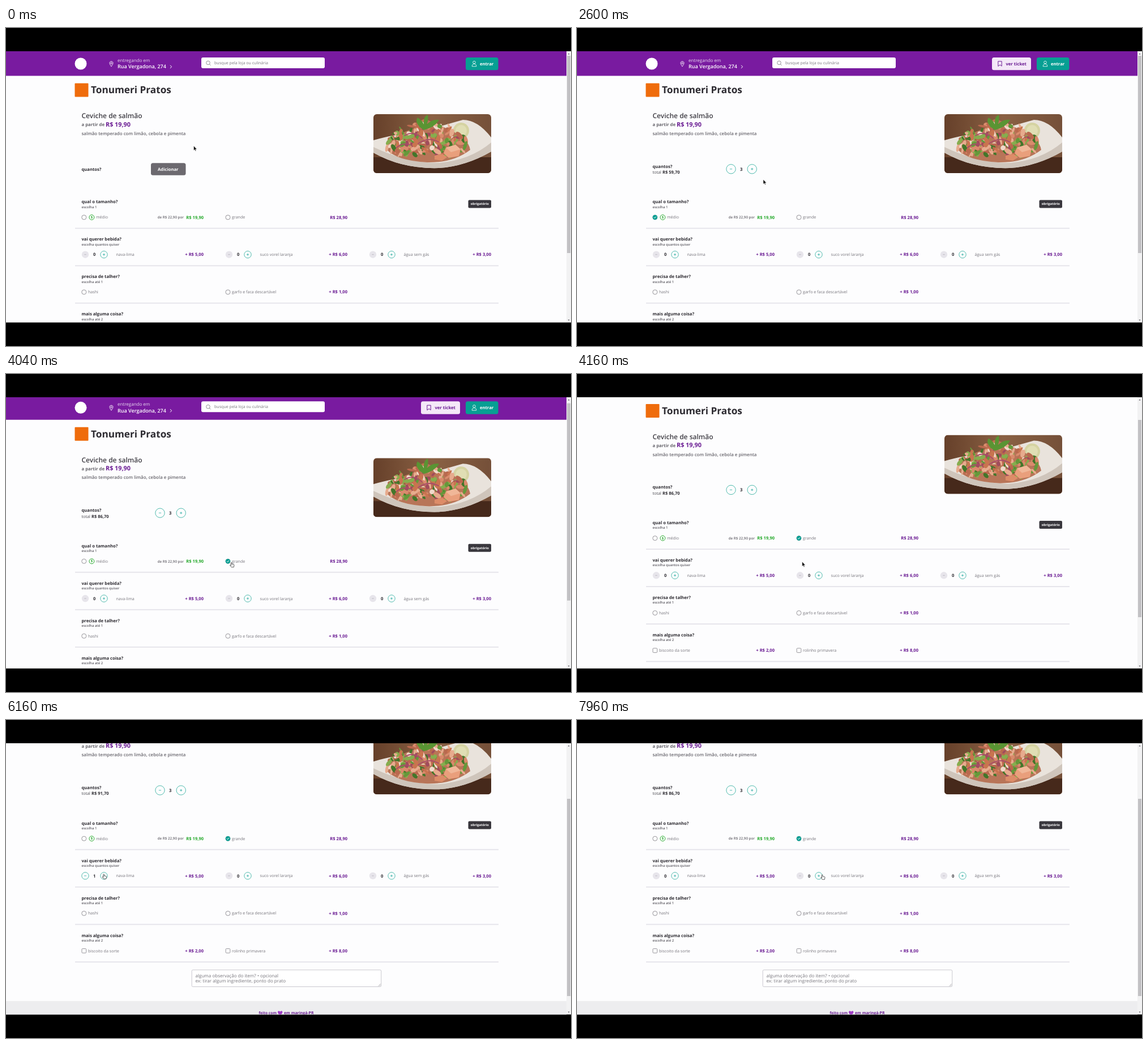
Write an HTML page that moves like this. It is 998 px wide and 561 px high and loops after 8000 ms.

```html
<!DOCTYPE html>
<html lang="pt-BR">
<head>
<meta charset="utf-8">
<title>Pedido</title>
<style>
  html, body { margin: 0; width: 100%; height: 100%; overflow: hidden; background: #000; }
  svg { display: block; width: 998px; height: 561px; font-family: "Open Sans", "Noto Sans", sans-serif; text-rendering: geometricPrecision; }
</style>
</head>
<body>
<svg id="stage" viewBox="0 0 998 561"></svg>
<script>
const LOOP = 8000, SCROLL = 124.8;
const INK = '#2d2b31', GREY = '#77757c', PURPLE = '#6a1b93', TEAL = '#079f93', GREEN = '#25a92b';

// y is the middle of the capitals
const text = (x, y, s, size, weight = 400, fill = GREY, anchor = 'start', id = '') =>
  `<text ${id && `id="${id}"`} x="${x}" y="${y + size * .36}" font-size="${size}" font-weight="${weight}" fill="${fill}" text-anchor="${anchor}">${s}</text>`;
const rect = (x, y, w, h, fill, r = 0, more = '') =>
  `<rect x="${x}" y="${y}" width="${w}" height="${h}" rx="${r}" fill="${fill}" ${more}/>`;
const circle = (x, y, r, fill, stroke = 'none', width = .8) =>
  `<circle cx="${x}" cy="${y}" r="${r}" fill="${fill}" stroke="${stroke}" stroke-width="${width}"/>`;
const path = (d, fill, stroke = 'none', width = 1) =>
  `<path d="${d}" fill="${fill}" stroke="${stroke}" stroke-width="${width}" stroke-linejoin="round" stroke-linecap="round"/>`;
const group = (id, body) => `<g id="${id}">${body}</g>`;

const price = (x, y, s) => text(x, y, s, 7.55, 700, PURPLE, 'end');
const heading = (y, title, note) =>
  text(133.5, y, title, 7.63, 700, INK) + text(133.5, y + 9, note, 5.97, 600, '#5e5c63');
const divider = y => rect(122, y - 1, 748, 1.8, '#e4e3ea');
const radio = (x, y) => circle(x, y, 4, '#fff', '#7b7980');
const check = (x, y) => circle(x, y, 4.2, TEAL) +
  path(`M${x - 1.9} ${y + .1}l1.4 1.4 2.4-2.7`, 'none', '#fff', 1);
const box = (x, y) => rect(x - 3.8, y - 3.8, 7.6, 7.6, '#fff', 1.3, 'stroke="#7b7980" stroke-width=".8"');
const button = (x, y, r, sign) => circle(x, y, r, '#fdfdfe', '#3db3a4', .9) +
  path(`M${x - 1.7} ${y}h3.4` + (sign == '+' ? `M${x} ${y - 1.7}v3.4` : ''), 'none', TEAL, .7);
const disabled = (x, y) => circle(x, y, 6.2, '#e7e5eb') + path(`M${x - 1.3} ${y}h2.6`, 'none', '#aaa6b0', .7);

const drink = (x, name, cost, id) => disabled(x + 6.5, 399.7) +
  (id ? group(id + 'Minus', button(x + 6.5, 399.7, 6.2, '-')) : '') +
  text(x + 22.7, 399.7, '0', 7.6, 700, INK, 'middle', id) + button(x + 39.5, 399.7, 6.2, '+') +
  text(x + 61, 399.7, name, 7.1) + price(x + 215.5, 399.7, cost);

function photo() {
  let seed = 11;
  const rnd = () => (seed = seed * 16807 % 2147483647) / 2147483647;
  const colors = ['#d98b6c', '#e7ab8d', '#c9744f', '#65983a', '#43762a', '#a04c5c', '#f0d9ca', '#86ad4e', '#b9694e'];
  let bits = '';
  for (let i = 0; i < 190; i++) {
    const a = rnd() * 6.283, d = Math.sqrt(rnd());
    const x = 744 + 72 * d * Math.cos(a), y = 207 + 29 * d * Math.sin(a) - 16 * (1 - Math.abs(x - 744) / 72);
    bits += `<ellipse cx="${x}" cy="${y}" rx="${3 + rnd() * 6}" ry="${1.4 + rnd() * 3}" fill="${colors[rnd() * 9 | 0]}" transform="rotate(${rnd() * 180} ${x} ${y})"/>`;
  }
  return `<g clip-path="url(#photoClip)">` + rect(649, 152, 208, 104, 'url(#wood)') +
    path('M649 228H857V256H649Z', '#46291b') +
    path('M649 198Q690 186 718 187L807 162Q833 162 857 193V218Q812 244 765 247Q700 249 649 220Z', '#e9e3dc') +
    path('M649 210Q710 239 765 238Q820 233 857 202V218Q812 244 765 247Q700 249 649 220Z', '#cfc5bb') +
    circle(804, 181, 14, '#d5d3a2') + circle(804, 181, 10, '#e0deb4') +
    path('M672 214Q676 192 718 178L744 162L780 178Q817 194 820 215Q790 238 744 237Q690 234 672 214Z', '#b87558') + bits +
    path('M738 180Q720 168 727 158Q735 163 738 170Q737 156 745 153Q747 166 742 171Q753 160 765 162Q758 175 738 180Z', '#5a9433') +
    path('M777 211l17-5 9 8-3 12-18 3-9-8Z', '#e99f7c') + path('M777 211l17-5 9 8-17 5Z', '#f0b798') +
    path('M757 225l14-3 8 6-9 6-13-2Z', '#dd8c68') +
    path('M704 190q15-10 31 4M728 204q18-13 36-3M690 211q11-10 24-5', 'none', '#a94a6b', 1.8) + '</g>';
}

const header = rect(0, 41, 990, 43.4, '#791ba0') + circle(132, 63, 10.5, '#fff') +
  path('M186 67.5C181.8 63 182.2 59 186 59S190.2 63 186 67.5Z', 'none', '#fff', .9) + circle(186, 62.2, 1.3, 'none', '#fff') +
  text(197, 57, 'entregando em', 8, 400, '#eadcf1') + text(197, 68, 'Rua Vergadona, 274', 9, 600, '#fff') +
  path('M290.3 66l2.3 2.4-2.3 2.4', 'none', '#fff', 1) +
  rect(345, 52, 218, 19, '#fff', 3) + circle(357, 61.4, 3.3, 'none', '#77757c') + path('M359.4 63.8l2 2', 'none', '#77757c', .8) +
  text(368, 61.6, 'busque pela loja ou culinária', 7.1, 500) +
  group('ticket', rect(733, 52, 69, 22.3, '#f4e8f8', 3.5) + path('M744.2 58.8h6v8.4l-3-2.2-3 2.2Z', 'none', PURPLE) +
    text(757.5, 63, 'ver ticket', 7.65, 700, PURPLE)) +
  rect(812, 52, 57.5, 22.3, TEAL, 3.5) + circle(827, 60.6, 2.3, 'none', '#fff') +
  path('M823.2 67.4q0-4 3.8-4t3.8 4Z', 'none', '#fff', .8) + text(837, 63, 'entrar', 7.65, 700, '#fff');

const item = rect(121.5, 97.5, 24, 24, '#ef6c0c', 1) + text(150, 109, 'Tonumeri Pratos', 17.2, 700, INK) +
  text(133.5, 155, 'Ceviche de salmão', 12, 600, '#3f3d44') +
  text(133.5, 170.6, 'a partir de', 7.75, 700, '#67656c') + text(176, 170, 'R$ 19,90', 10.8, 700, PURPLE) +
  text(133.5, 186.2, 'salmão temperado com limão, cebola e pimenta', 7.93, 600, '#67656c') + photo() +
  group('empty', text(133.5, 248.8, 'quantos?', 7.63, 700, INK) + rect(256, 238.3, 61.5, 21.4, '#6c696f', 3.5) +
    text(286.3, 248.8, 'Adicionar', 7.64, 700, '#fff', 'middle')) +
  group('added', text(133.5, 244, 'quantos?', 7.63, 700, INK) + text(133.5, 254.6, 'total', 7.3, 400, '#4c4a51') +
    text(151, 254.6, '', 7.5, 700, INK, 'start', 'total') +
    group('trash', path('M268 245.5h8v7.4q0 1.2-1.2 1.2h-5.6q-1.2 0-1.2-1.2ZM266.8 245.5h10.4M270 245.3v-1.8h4v1.8M270.6 248.8v2.4M273.4 248.8v2.4', 'none', TEAL, 1.2)) +
    group('less', button(272, 248.8, 8.2, '-')) + text(290.3, 248.8, '', 7.7, 700, INK, 'middle', 'count') + button(309.2, 248.8, 8.2, '+'));

const options = heading(306.6, 'qual o tamanho?', 'escolha 1') + rect(816.5, 303.4, 40.5, 14, '#39373d', 2) +
  text(836.8, 310.2, 'obrigatório', 5.7, 700, '#fff', 'middle') +
  radio(137.8, 334) + group('medium', check(137.8, 334)) + circle(151.4, 334, 4.4, '#fdfdfe', GREEN, 1) +
  text(151.4, 334, '$', 6, 700, GREEN, 'middle') + text(159, 333.8, 'médio', 7.1) +
  text(314, 334, 'de R$ 22,90 por', 6.25, 600, '#67656c', 'end') + text(349, 333.8, 'R$ 19,90', 7.55, 700, GREEN, 'end') +
  radio(392, 334) + group('large', check(392, 334)) + text(399, 333.8, 'grande', 7.1) + price(603, 333.8, 'R$ 28,90') + divider(353.5) +
  heading(372.6, 'vai querer bebida?', 'escolha quantos quiser') +
  drink(133.5, 'nava-lima', '+ R$ 5,00', 'soda') + drink(387.5, 'suco vorel laranja', '+ R$ 6,00', '') +
  drink(641.5, 'água sem gás', '+ R$ 3,00', '') + divider(419.5) +
  heading(438.6, 'precisa de talher?', 'escolha até 1') + radio(137.8, 465.9) + text(145, 465.7, 'hashi', 7.1) +
  radio(392, 465.9) + text(399, 465.7, 'garfo e faca descartável', 7.1) + price(603, 465.7, '+ R$ 1,00') + divider(485.5) +
  heading(504.6, 'mais alguma coisa?', 'escolha até 2') + box(137.8, 532) + text(145, 531.8, 'biscoito da sorte', 7.1) + price(349, 531.8, '+ R$ 2,00') +
  box(392, 532) + text(399, 531.8, 'rolinho primavera', 7.1) + price(603, 531.8, '+ R$ 8,00') + divider(551.7);

const footer = rect(328.2, 565.7, 334.5, 29.6, '#fff', 2, 'stroke="#c5c3ca" stroke-width=".9"') +
  text(334.5, 575.6, 'alguma observação do item? • opcional', 8.05) +
  text(334.5, 585.1, 'ex: tirar algum ingrediente, ponto do prato', 8.05) +
  path('M658 594l3.4-3.4M660.2 594l1.2-1.2', 'none', '#77757c', .6) +
  rect(0, 620.5, 990, 60, '#ededef') + text(446.5, 641.4, 'feito com', 6.7, 700, PURPLE) +
  path('M484.2 645.6C476.6 640.5 481 635.8 484.2 639.2C487.4 635.8 491.8 640.5 484.2 645.6Z', '#a03fc6') +
  text(491, 641.4, 'em maringá-PR', 6.9, 700, PURPLE);

const scrollbar = rect(990, 41, 8, 478.5, '#f2f2f3') + path('M992.5 46.5h3l-1.5-2Z', '#55535a') +
  path('M992.5 514.5h3l-1.5 2Z', '#55535a') + rect(991, 49, 6, 348, '#c2c1c4', 0, 'id="thumb"');

const pointer = group('arrow', path('M0 0V8L1.9 6.4 3.1 9.2 4.4 8.6 3.2 5.9H5.6Z', '#111', '#fff', .5)) +
  group('hand', path('M.4 .9Q1.2-.2 2 .9V3.4L5.4 4.1Q6 4.3 6 5L5.3 8.8H1.2L-1.5 5.6Q-1.2 4.6-.3 5.1L.4 5.7Z', '#fff', '#222', .7));

stage.innerHTML = `<defs>
  <clipPath id="view"><rect y="41" width="990" height="478.5"/></clipPath>
  <clipPath id="photoClip"><rect x="649" y="152" width="208" height="104" rx="6"/></clipPath>
  <linearGradient id="wood"><stop stop-color="#66402a"/><stop offset=".5" stop-color="#8a6144"/><stop offset="1" stop-color="#755039"/></linearGradient>
  </defs><rect width="998" height="561"/><g clip-path="url(#view)">` + rect(0, 41, 990, 479, '#fdfdfe') +
  group('page', header + item + options + footer) + '</g>' + scrollbar + group('cursor', pointer);

// cursor stops: time, x, y
const stops = [[0, 331.5, 208], [150, 331.5, 208], [800, 292, 251.5], [1320, 292, 251.5], [1560, 308.5, 247.5],
  [2400, 308.5, 247.5], [3040, 396, 332.5], [4040, 397, 332], [4500, 401, 328], [4800, 401, 328],
  [5600, 171.5, 271.5], [6400, 171.5, 271.5], [6800, 140, 271.5], [7100, 140, 271.5], [7760, 432, 272.5], [LOOP, 432, 272.5]];
const hovers = [[700, 1000], [1480, 2460], [2950, 4060], [5480, 6460], [6680, 7160], [7680, LOOP]];

const el = id => document.getElementById(id);
const show = (id, on) => el(id).style.display = on ? '' : 'none';
const ease = (t, from, to) => {
  const k = Math.min(1, Math.max(0, (t - from) / (to - from)));
  return k * k * (3 - 2 * k);
};

function draw(t) {
  const added = t >= 1000, large = t >= 3480, soda = t >= 5900 && t < 6900 ? 1 : 0;
  const count = t < 1800 ? 1 : t < 2200 ? 2 : 3;
  const total = count * (large ? 28.9 : 19.9) + soda * 5;
  show('empty', !added);
  show('added', added);
  show('ticket', added);
  show('trash', count == 1);
  show('less', count > 1);
  show('medium', added && !large);
  show('large', large);
  show('sodaMinus', soda);
  el('soda').textContent = soda;
  el('count').textContent = count;
  el('total').textContent = 'R$ ' + total.toFixed(2).replace('.', ',');

  const scroll = ease(t, 4000, 4400);
  el('page').setAttribute('transform', `translate(0 ${-SCROLL * scroll})`);
  el('thumb').setAttribute('y', 49 + 90 * scroll);

  const i = stops.findIndex(s => s[0] > t);
  const [t0, x0, y0] = stops[i - 1], [t1, x1, y1] = stops[i], k = ease(t, t0, t1);
  el('cursor').setAttribute('transform', `translate(${x0 + (x1 - x0) * k} ${y0 + (y1 - y0) * k})`);
  const hover = hovers.some(([from, to]) => t >= from && t < to);
  show('hand', hover);
  show('arrow', !hover);
}

const start = performance.now();
function frame() {
  draw((performance.now() - start) % LOOP);
  requestAnimationFrame(frame);
}
frame();
</script>
</body>
</html>
```
